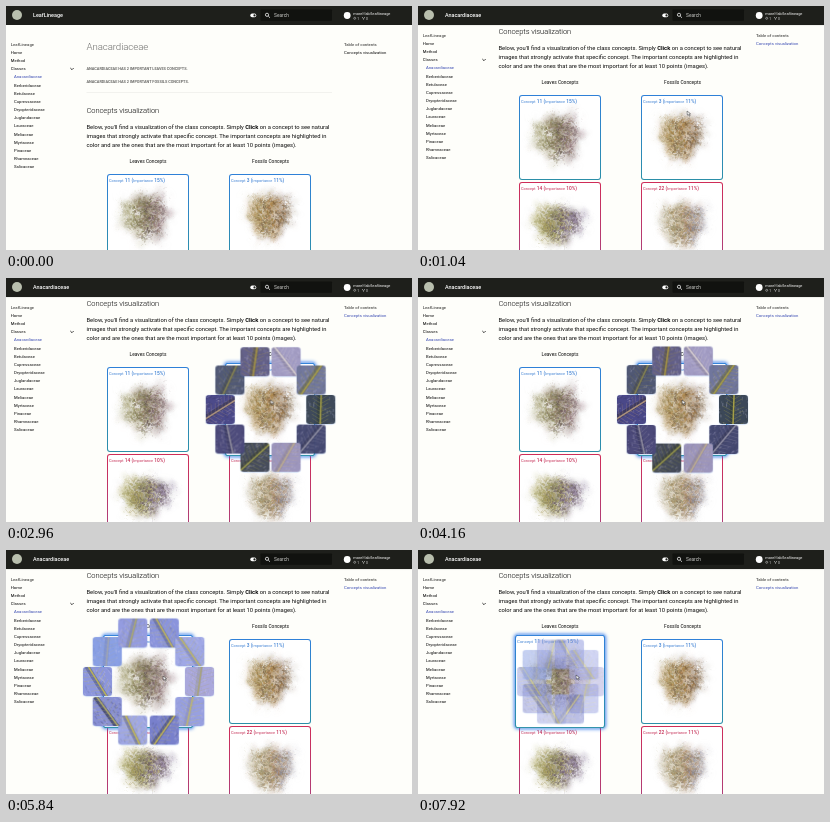
Write an HTML page with a canvas that moves like this. It is 406 px wide and 244 px high and loops after 8 s.

```html
<!DOCTYPE html>
<html lang="en">
<head>
<meta charset="utf-8">
<title>Concepts visualization</title>
<style>
html, body { margin: 0; width: 100%; height: 100%; overflow: hidden; background: #fefefa; }
#stage { position: relative; width: 406px; height: 244px; overflow: hidden; background: #fefefa; font-family: Roboto, sans-serif; }
#stage svg { position: absolute; left: 0; top: 0; overflow: visible; }
text { font-family: Roboto, sans-serif; fill: #080808; white-space: pre; }

#page, .side, #toc, #head text, #headShade, .card, .thumb, #cursor {
  animation: 8s linear infinite;
}
#page { position: absolute; left: 0; top: 0; width: 406px; height: 340px; animation-name: scroll; }
.side { animation-name: side; }
#toc { animation-name: active; }
#head #site { animation-name: siteOut; }
#head #topic { animation-name: topicIn; }
#headShade { position: absolute; left: 0; top: 0; width: 406px; height: 19px; animation-name: shade; }

.h1 { font-size: 9.7px; font-weight: 300; letter-spacing: -.01em; fill: #6c6c6a; }
.h2 { font-size: 7.55px; font-weight: 300; letter-spacing: -.01em; }
.h5 { font-size: 3.88px; font-weight: 700; letter-spacing: -.01em; fill: #6c6c6a; }
.p { font-size: 5.8px; }
.col { font-size: 4.85px; text-anchor: middle; }
.nav { font-size: 4.24px; }
.cap { font-weight: 500; fill: #4c4c4a; }
.on { fill: #3446b0; }

.card {
  position: absolute; box-sizing: border-box; width: 82px; height: 84.5px;
  border: 1px solid transparent; border-radius: 3px;
  background: linear-gradient(#fff, #fff) padding-box, linear-gradient(var(--c1), var(--c2)) border-box;
}
.card canvas { position: absolute; left: 0; top: 0; width: 80px; height: 82px; }
.card text { font-size: 4.85px; font-weight: 500; fill: var(--ink); }
.card .s { font-size: 3.9px; font-weight: 400; }
#fossil { animation-name: hoverFossil; }
#leaf { animation-name: hoverLeaf; }
.thumb {
  position: absolute; width: 29px; height: 29px; margin: -14.5px; border-radius: 3.2px;
  box-shadow: 0 .3px 1px rgba(50, 120, 225, .6); opacity: 0;
}
.fanF { animation-name: fanFossil; }
.fanL { animation-name: fanLeaf; }
#stage #cursor { animation-name: cursor; }

@keyframes scroll {
  0%, 1.4% { transform: none; animation-timing-function: ease-in-out; }
  12.6%, 100% { transform: translateY(-79px); }
}
@keyframes side {
  0%, 1.4% { transform: none; animation-timing-function: ease-in; }
  4.1%, 100% { transform: translateY(-9px); }
}
@keyframes active { 0%, 11% { fill: #080808; } 12.6%, 100% { fill: #3446b0; } }
@keyframes siteOut {
  0%, 8% { transform: none; opacity: 1; }
  10% { opacity: 0; }
  13%, 100% { transform: translateX(-7.5px); opacity: 0; }
}
@keyframes topicIn {
  0%, 8% { transform: translateX(7.5px); opacity: 0; animation-timing-function: ease-out; }
  12.8%, 100% { transform: none; opacity: 1; }
}
@keyframes shade {
  0%, 5% { box-shadow: 0 0 0 rgba(0, 0, 0, 0); }
  8%, 100% { box-shadow: 0 .5px 1.4px rgba(0, 0, 0, .2); }
}
@keyframes hoverFossil {
  0%, 13.2% { transform: none; box-shadow: 0 0 0 rgba(40, 115, 235, 0); z-index: 1; animation-timing-function: ease; }
  17.2%, 56% { transform: scale(1.1); box-shadow: 0 0 3.4px .7px rgba(40, 115, 235, .95); z-index: 2; animation-timing-function: ease; }
  60%, 100% { transform: none; box-shadow: 0 0 0 rgba(40, 115, 235, 0); z-index: 1; }
}
@keyframes hoverLeaf {
  0%, 57.7% { transform: none; box-shadow: 0 0 0 rgba(40, 115, 235, 0); z-index: 1; animation-timing-function: ease; }
  61.7%, 100% { transform: scale(1.1); box-shadow: 0 0 3.4px .7px rgba(40, 115, 235, .95); z-index: 2; }
}
@keyframes fanFossil {
  0%, 32.9% { transform: none; opacity: 0; animation-timing-function: ease; }
  37.8%, 52.2% { transform: translate(var(--x), var(--y)); opacity: 1; animation-timing-function: ease; }
  57.2%, 100% { transform: none; opacity: 0; }
}
@keyframes fanLeaf {
  0%, 68.3% { transform: none; opacity: 0; animation-timing-function: ease; }
  73%, 97.6% { transform: translate(var(--x), var(--y)); opacity: 1; animation-timing-function: cubic-bezier(.3, .1, .6, .9); }
  100% { transform: translate(calc(var(--x) * .35), calc(var(--y) * .35)); opacity: .25; }
}
@keyframes cursor {
  0%, 12% { transform: translate(269px, 104px); opacity: 0; }
  12.1%, 13% { transform: translate(269px, 105px); opacity: 1; animation-timing-function: ease-out; }
  21%, 33% { transform: translate(269px, 120px); animation-timing-function: ease-in-out; }
  38%, 53% { transform: translate(264px, 122px); animation-timing-function: ease-in-out; }
  61.8%, 97.6% { transform: translate(157px, 126px); }
  99%, 100% { transform: translate(158px, 125px); opacity: 1; }
}
</style>
</head>
<body>
<div id="stage">
  <div id="page">
    <svg width="406" height="340">
      <text class="h1" x="80.5" y="44.3">Anacardiaceae</text>
      <text class="h5" x="80.5" y="64">ANACARDIACEAE HAS 2 IMPORTANT LEAVES CONCEPTS.</text>
      <text class="h5" x="80.5" y="76.8">ANACARDIACEAE HAS 2 IMPORTANT FOSSILS CONCEPTS.</text>
      <path d="M80.5 86.5H326" stroke="#e6e6e2" stroke-width=".5"/>
      <text class="h2" x="80.5" y="107.4">Concepts visualization</text>
      <text class="p" x="80.5" y="122.8">Below, you'll find a visualization of the class concepts. Simply <tspan font-weight="700">Click</tspan> on a concept to see natural</text>
      <text class="p" x="80.5" y="132.1">images that strongly activate that specific concept. The important concepts are highlighted in</text>
      <text class="p" x="80.5" y="141.4">color and are the ones that are the most important for at least 10 points (images).</text>
      <text class="col" x="142" y="156.8">Leaves Concepts</text>
      <text class="col" x="264.5" y="156.8">Fossils Concepts</text>
    </svg>
  </div>
  <svg width="406" height="244">
    <g class="side nav" id="nav">
      <text class="cap" x="4.8" y="39.6">LeafLineage</text>
      <path d="M64.3 62l1.7 1.7 1.7-1.7" fill="none" stroke="#111" stroke-width=".8"/>
    </g>
    <g class="side nav">
      <text class="cap" x="338" y="39.6">Table of contents</text>
      <text id="toc" x="338" y="48">Concepts visualization</text>
    </g>
  </svg>
  <div id="headShade"></div>
  <svg id="head" width="406" height="19">
    <rect width="406" height="19" fill="#1e1f1b"/>
    <circle cx="11" cy="9" r="5" fill="#b9bfae"/>
    <g font-size="5.45" font-weight="500">
      <text id="site" x="27" y="11.3" style="fill:#fff">LeafLineage</text>
      <text id="topic" x="27" y="11.3" style="fill:#fff">Anacardiaceae</text>
    </g>
    <rect x="244.3" y="7.6" width="6" height="3.6" rx="1.8" fill="#fff"/>
    <circle cx="248.5" cy="9.4" r="1.1" fill="#1e1f1b"/>
    <rect x="254.5" y="3.6" width="71.5" height="11.2" rx=".7" fill="#11120f"/>
    <g fill="none" stroke="#fff" stroke-width=".75">
      <circle cx="261" cy="8.8" r="1.6"/><path d="M262.2 10l1.8 1.8"/>
    </g>
    <text x="268" y="11.2" font-size="4.85" style="fill:#c9c9c6">Search</text>
    <circle cx="341.2" cy="9.5" r="3.4" fill="#fff"/>
    <text x="347.3" y="8.6" font-size="3.94" style="fill:#fff">morel-lab/leaflineage</text>
    <g font-size="3.3">
      <circle cx="348.7" cy="12.3" r="1" fill="none" stroke="#ddd" stroke-width=".5"/>
      <text x="351.2" y="13.5" style="fill:#ddd">1</text>
      <path d="M356.5 11v1l1 .6 1-.6v-1M357.5 12.6v1.2" fill="none" stroke="#ddd" stroke-width=".5"/>
      <text x="360" y="13.5" style="fill:#ddd">0</text>
    </g>
  </svg>
  <svg id="cursor" width="6" height="7">
    <path d="M0 0L.3 4.1 1.3 3.3 2.2 5.1 3.1 4.6 2.3 2.9 3.5 2.7Z" fill="#fff" stroke="#111" stroke-width=".45"/>
  </svg>
</div>
<script>
const SVG = 'http://www.w3.org/2000/svg';
const page = document.getElementById('page');
const nav = document.getElementById('nav');

const links = ['Home', 'Method', 'Classes', 'Anacardiaceae', 'Berberidaceae', 'Betulaceae', 'Cupressaceae',
  'Dryopteridaceae', 'Juglandaceae', 'Lauraceae', 'Meliaceae', 'Myrtaceae', 'Pinaceae', 'Rhamnaceae', 'Salicaceae'];
links.forEach((name, i) => {
  const t = document.createElementNS(SVG, 'text');
  t.setAttribute('x', i < 3 ? 4.8 : 8);
  t.setAttribute('y', 48 + i * 8.16);
  if (i === 3) t.setAttribute('class', 'on');
  t.textContent = name;
  nav.append(t);
});

function random(seed) {
  return () => {
    seed = (seed + 0x6D2B79F5) | 0;
    let t = Math.imul(seed ^ (seed >>> 15), 1 | seed);
    t ^= t + Math.imul(t ^ (t >>> 7), 61 | t);
    return ((t ^ (t >>> 14)) >>> 0) / 4294967296;
  };
}

function canvas(w, h, k) {
  const el = document.createElement('canvas');
  el.width = w * k;
  el.height = h * k;
  const g = el.getContext('2d');
  g.scale(k, k);
  return [el, g];
}

// Lumpy cloud: overlapping dabs coloured from left to right, pale at the rim
function cloud({ seed, x, y, rx, ry, inks }) {
  const [el, g] = canvas(80, 82, 3);
  const rnd = random(seed);
  const rim = a => 1 + .12 * Math.sin(3 * a + seed) + .1 * Math.sin(7 * a + 2 * seed);

  function layer(count, reach, size, alpha) {
    for (let i = 0; i < count; i++) {
      const a = rnd() * 2 * Math.PI;
      const d = Math.sqrt(rnd()) * reach;
      const dx = Math.cos(a) * d * rim(a);
      const dy = Math.sin(a) * d * rim(a);
      const tone = (dx + 1) / 2 + (rnd() - .5) * .6;
      g.globalAlpha = alpha * Math.min(1, Math.max(.1, (reach - d) * 2.5));
      g.fillStyle = inks[Math.max(0, Math.min(inks.length - 1, Math.floor(tone * inks.length)))];
      g.beginPath();
      g.ellipse(x + dx * rx, y + dy * ry, size * (.5 + rnd()), size * (.3 + rnd() * .5), a + rnd() * 2, 0, 7);
      g.fill();
    }
  }

  g.filter = 'blur(6px)';
  layer(160, 1.3, 5, .07);
  layer(240, 1, 4, .18);
  g.filter = 'none';
  layer(170, 1.3, .9, .22);
  layer(620, 1, 1.5, .36);
  return el;
}

const blue = ['#2f80d8', '#2b8fa8', '#3a7ed2'];
const red = ['#cf2c58', '#a8427e', '#c42c54'];
const cards = [
  { id: 'leaf', left: 101, top: 168, n: 11, pct: 15, tone: blue,
    seed: 4, x: 37.5, y: 41, rx: 24, ry: 25, inks: ['#b0aa80', '#8f8a58', '#6e6844', '#8c7660', '#5c4c4c', '#8a6c74'] },
  { id: 'fossil', left: 223, top: 168, n: 3, pct: 11, tone: blue,
    seed: 9, x: 39, y: 40, rx: 23, ry: 24, inks: ['#b8a070', '#8a7c48', '#ac8444', '#6c5434', '#a87c4c', '#7c6a54'] },
  { id: 'leaf2', left: 101, top: 255, n: 14, pct: 10, tone: red,
    seed: 15, x: 37.5, y: 40.5, rx: 26, ry: 21, inks: ['#a49c58', '#8c8a4c', '#a8985c', '#6c6450', '#5e4c5e', '#7a6884'] },
  { id: 'fossil2', left: 223, top: 255, n: 22, pct: 11, tone: red,
    seed: 22, x: 41, y: 41, rx: 23, ry: 24, inks: ['#b4a888', '#948c68', '#b09464', '#807058', '#a8846c', '#9090a0'] }
];
for (const c of cards) {
  const el = document.createElement('div');
  el.className = 'card';
  el.id = c.id;
  el.style.cssText = `left:${c.left}px;top:${c.top}px;--c1:${c.tone[0]};--c2:${c.tone[1]};--ink:${c.tone[2]}`;
  el.append(cloud(c));
  el.insertAdjacentHTML('beforeend', `<svg width="80" height="82"><text x="1" y="6.7"><tspan class="s">Concept</tspan> ${c.n} (<tspan class="s">Importance</tspan> ${c.pct}%)</text></svg>`);
  page.append(el);
}

// Tinted close-up: mottled base, leaf band, midrib and side veins
function closeUp(base, band, rib, deg, seed) {
  const [el, g] = canvas(29, 29, 2);
  const rnd = random(seed);
  g.fillStyle = base;
  g.fillRect(0, 0, 29, 29);
  g.translate(14.5, 14.5);
  g.rotate(deg * Math.PI / 180);
  for (let i = 0; i < 170; i++) {
    g.globalAlpha = .22;
    g.fillStyle = rnd() < .5 ? band : '#d4d2ee';
    g.fillRect(rnd() * 44 - 22, rnd() * 44 - 22, .5 + rnd(), 1 + rnd() * 3);
  }
  g.globalAlpha = .65;
  g.fillStyle = band;
  g.fillRect(-3.5, -22, 5, 44);
  g.globalAlpha = .35;
  g.strokeStyle = rib;
  g.lineWidth = .6;
  for (let y = -22; y < 26; y += 4) {
    const w = 7 + rnd() * 6;
    g.beginPath();
    g.moveTo(-w, y - 5);
    g.lineTo(0, y);
    g.lineTo(w, y - 5);
    g.stroke();
  }
  g.globalAlpha = .9;
  g.fillStyle = rib;
  g.fillRect(-.7, -22, 1.5, 44);
  return el;
}

function fan(cls, cx, cy, looks) {
  looks.forEach(([base, band, rib, deg], i) => {
    const a = i * Math.PI / 5;
    const el = closeUp(base, band, rib, deg, i + cx);
    el.className = 'thumb ' + cls;
    el.style.cssText = `left:${cx}px;top:${cy}px;z-index:3;--x:${51 * Math.cos(a)}px;--y:${51 * Math.sin(a)}px`;
    page.append(el);
  });
}

// Clockwise, starting at the right
fan('fanF', 264.5, 210.5, [
  ['#3c4858', '#303c38', '#b0a848', 2],
  ['#464a72', '#383a58', '#9a98ac', 40],
  ['#9c95bc', '#8f8498', '#c0b090', 30],
  ['#454b5a', '#3a4038', '#a2a04e', 48],
  ['#4c4a7a', '#3a385c', '#9c98a8', -12],
  ['#4a4888', '#38344c', '#b89c80', 58],
  ['#505874', '#484a50', '#8e8a50', 25],
  ['#625f88', '#5c5648', '#b09c44', 8],
  ['#a29cc4', '#8c84a0', '#e0d8d8', -38],
  ['#70769c', '#66684c', '#b0a444', 35]
]);
fan('fanL', 142, 210.5, [
  ['#aaa8dc', '#9c9cae', '#a8a47c', 8],
  ['#98a0e0', '#8c90c0', '#c4bc68', 12],
  ['#7880cc', '#444a74', '#d0c050', 35],
  ['#a0a8e4', '#6c7090', '#ccc050', -26],
  ['#8890d4', '#30344c', '#b8b468', -36],
  ['#8c96dc', '#586090', '#c0b850', -32],
  ['#8aa0e4', '#7c8cc8', '#a4a8b0', 5],
  ['#949ce0', '#8084a8', '#b0ac6c', 14],
  ['#8a94dc', '#606898', '#c8bc54', -30],
  ['#a0a8e6', '#8088b8', '#c4bc60', -35]
]);
</script>
</body>
</html>
```
